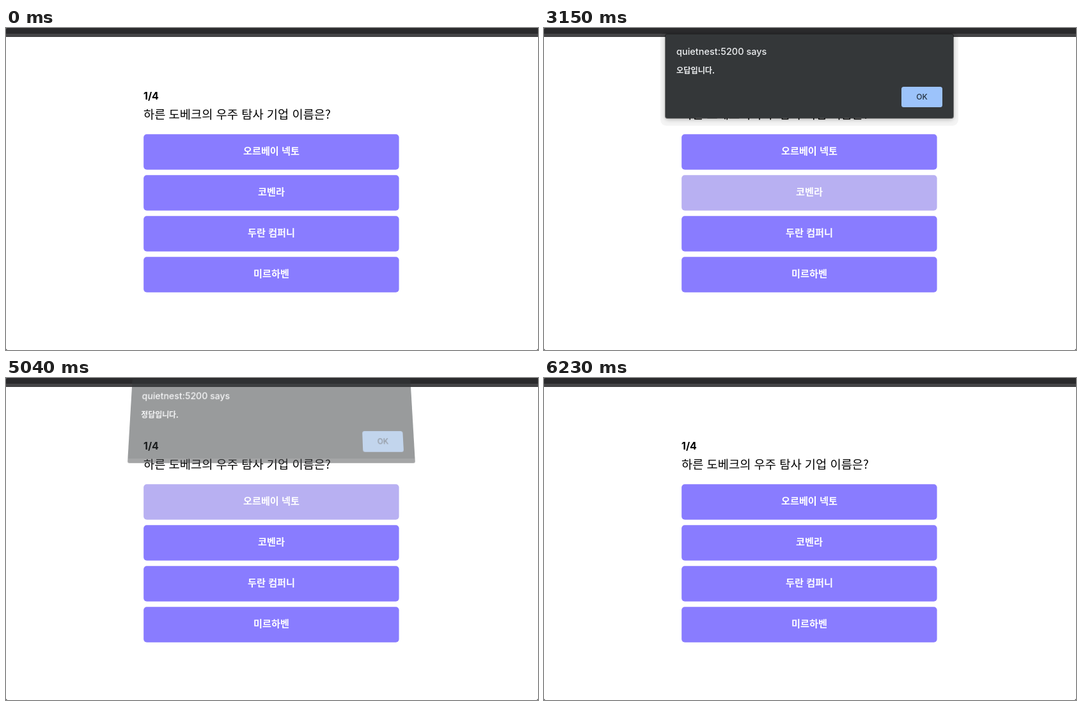
Write an HTML page that moves like this. It is 832x504 px and loops after 6650 ms.

```html
<!DOCTYPE html>
<html lang="ko">
<head>
<meta charset="utf-8">
<title>Quiz</title>
<style>
html, body { margin: 0; width: 100%; height: 100%; overflow: hidden; background: #fff; }
body { position: relative; }
#page { position: absolute; left: 0; top: 0; display: block; }
text { font-family: "Noto Sans CJK KR", "Noto Sans CJK", sans-serif; }
.num, .latin { font-family: Inter, "Open Sans", sans-serif; }
.num { font-size: 16px; font-weight: 700; }
.question { font-size: 18.7px; }
.label { font-size: 15.2px; font-weight: 600; fill: #fff; text-anchor: middle; }
#dialog {
  position: absolute; left: 190px; top: 10px; width: 450px; height: 131px;
  transform-origin: 0 0; border-radius: 3px; background: #343739;
}
#dialog.shaded {
  box-shadow: 0 0 0 1px rgba(0, 0, 0, .45), 0 2px 7px rgba(0, 0, 0, .28),
    0 4px 0 8px rgba(0, 0, 0, .045);
}
#dialog.opening { background: linear-gradient(#343739 124px, #4c4e50 124px); }
#dialog svg { display: block; }
.title { font-size: 14.5px; font-weight: 500; fill: #eceef0; }
.message { font-size: 12.2px; font-weight: 600; fill: #eceef0; }
.ok { font-size: 12px; font-weight: 500; fill: #24303f; text-anchor: middle; }
</style>
</head>
<body>
<svg id="page" width="832" height="504" viewBox="0 0 832 504">
  <rect width="832" height="504" fill="#fff"/>
  <rect width="832" height="9" fill="#2a2a2c"/>
  <rect y="9" width="832" height="4" fill="#454547"/>
  <rect y="13" width="832" height="1" fill="#38383a"/>
  <path d="M0 502v2h2zM832 502v2h-2zM0 0h2l-2 2z" fill="#555"/>
  <text class="num" x="215" y="112">1/4</text>
  <text class="question" x="215" y="141.5">하른 도베크의 우주 탐사 기업 이름은?</text>
  <g id="answers"></g>
</svg>
<div id="dialog">
  <svg width="450" height="131" viewBox="0 0 450 131">
    <text class="latin title" x="17" y="32">quietnest:5200 says</text>
    <text class="message" id="message" x="17" y="60.8"></text>
    <rect id="ok" x="369" y="82" width="64" height="32" rx="3.5"/>
    <text class="latin ok" x="401" y="102">OK</text>
  </svg>
</div>
<script>
const LOOP = 6650, STEP = 70, W = 450, H = 131;
const $ = id => document.getElementById(id);
const dialog = $('dialog'), message = $('message'), ok = $('ok');

const rounds = [
  { answer: 1, hover: 2030, open: 2730, okHover: 3780, close: 3920, end: 4060,
    show: [0.4, 0.08], hide: [0.5, 1], text: '오답입니다.' },
  { answer: 0, hover: 4270, open: 5040, okHover: 5810, close: 6020, end: 6230,
    show: [0.45, 0.1], hide: [0.12, 0.6, 1], text: '정답입니다.' }
];

function add(parent, tag, attrs, content = '') {
  const el = document.createElementNS('http://www.w3.org/2000/svg', tag);
  for (const key in attrs) el.setAttribute(key, attrs[key]);
  el.textContent = content;
  return parent.appendChild(el);
}

const buttons = ['오르베이 넥토', '코벤라', '두란 컴퍼니', '미르하벤'].map((name, i) => {
  const y = 166 + 64 * i;
  const box = add($('answers'), 'rect',
    { x: 215.2, y: y + 0.2, width: 399.4, height: 55.6, rx: 5 });
  add($('answers'), 'text', { class: 'label', x: 415, y: y + 31.7 }, name);
  return box;
});

// Tilts the top edge away while the sheet slides up.
function tilt(p) {
  if (!p) return 'none';
  const k = W / (W - 34 * p) - 1, c = W / 2;
  const top = -18 * p * (1 + k), bottom = H - 17 * p;
  return `matrix3d(1,0,0,0,${-c * k / H},${(bottom - top) / H},0,${-k / H},` +
    `0,0,1,0,${c * k},${top},0,${1 + k})`;
}

function render(time) {
  const t = Math.floor((time % LOOP) / STEP) * STEP;
  const round = rounds.find(r => t >= r.hover && t < r.end);
  buttons.forEach((box, i) =>
    box.setAttribute('fill', round && round.answer === i ? '#b8b0f2' : '#897cff'));

  const visible = round && t >= round.open;
  dialog.style.display = visible ? 'block' : 'none';
  if (!visible) return;

  const closing = t >= round.close;
  const poses = closing ? round.hide : round.show;
  const p = poses[(t - (closing ? round.close : round.open)) / STEP] || 0;
  const opening = !closing && p > 0.3;
  dialog.style.transform = tilt(p);
  dialog.style.opacity = 1 - (closing ? 0.88 : 1.1) * p;
  dialog.classList.toggle('shaded', p < 0.3);
  dialog.classList.toggle('opening', opening);
  message.textContent = round.text;
  ok.setAttribute('fill', opening ? '#86abdc' : t >= round.okHover ? '#a1c8fc' : '#9cc3fb');
}

const start = performance.now();
function tick() {
  render(performance.now() - start);
  requestAnimationFrame(tick);
}
tick();
</script>
</body>
</html>
```
